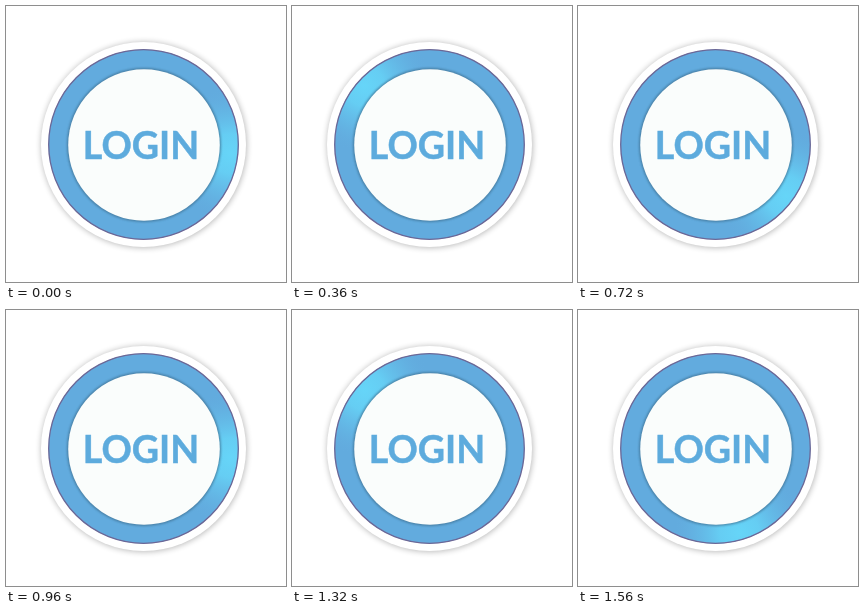
Recreate the animation shown at these times as an HTML page. Size 280 by 276 pixels, loop 1.6 s.

```html
<!DOCTYPE html>
<html lang="en">
<head>
<meta charset="utf-8">
<title>Login button</title>
<style>
html, body { margin: 0; width: 100%; height: 100%; overflow: hidden; background: #fff; }
svg { display: block; width: 280px; height: 276px; }
text { font: 700 37.6px Lato, Carlito, sans-serif; }
</style>
</head>
<body>
<svg viewBox="0 0 280 276">
  <defs>
    <radialGradient id="glow" gradientUnits="userSpaceOnUse" cx="225" cy="138.5" r="66">
      <stop offset="0" stop-color="#66d5f8"/>
      <stop offset=".3" stop-color="#66d2f6" stop-opacity=".88"/>
      <stop offset=".65" stop-color="#65c4ed" stop-opacity=".4"/>
      <stop offset="1" stop-color="#64addf" stop-opacity="0"/>
    </radialGradient>
    <filter id="soft" x="-20%" y="-20%" width="140%" height="140%">
      <feGaussianBlur stdDeviation="3.2"/>
    </filter>
    <filter id="rim" x="-10%" y="-10%" width="120%" height="120%">
      <feGaussianBlur stdDeviation="1.1"/>
    </filter>
  </defs>
  <circle cx="138" cy="139" r="102.5" fill="#000" opacity=".3" filter="url(#soft)"/>
  <circle cx="137.5" cy="138.5" r="102.5" fill="#fff"/>
  <circle cx="137.5" cy="138.5" r="95" fill="#62abde"/>
  <circle id="light" cx="137.5" cy="138.5" r="95" fill="url(#glow)"/>
  <circle cx="137.5" cy="138.5" r="94.8" fill="none" stroke="#6c6796" stroke-width="1.3"/>
  <circle cx="138" cy="139" r="77" fill="#3d6f91" opacity=".75" filter="url(#rim)"/>
  <circle cx="138" cy="139" r="75.8" fill="#fafdfc"/>
  <text x="135" y="152.6" text-anchor="middle" fill="#5dabdd" stroke="#5dabdd" stroke-width=".5">LOGIN</text>
</svg>
<script>
const LOOP = 1600, STEP = 40, TURN = 960;
// time in ms, counter-clockwise angle in degrees
const keys = [[0, -6], [160, 44], [360, 138], [560, 246], [600, 286], [920, 354], [960, 354]];
const slope = i => (keys[i + 1][1] - keys[i][1]) / (keys[i + 1][0] - keys[i][0]);

function tangent(i) {
  if (i === 0) return slope(0) * 0.8;
  if (i === keys.length - 1) return 0;
  const a = slope(i - 1), b = slope(i);
  return a * b > 0 ? 2 * a * b / (a + b) : 0;
}

function angleAt(t) {
  let i = 0;
  while (i < keys.length - 2 && t >= keys[i + 1][0]) i++;
  const [t0, a0] = keys[i], [t1, a1] = keys[i + 1];
  const h = t1 - t0, u = (t - t0) / h, v = 1 - u;
  return a0 * (1 + 2 * u) * v * v + a1 * u * u * (3 - 2 * u)
    + h * u * v * (tangent(i) * v - tangent(i + 1) * u);
}

const light = document.getElementById('light');

function draw(ms) {
  const t = Math.floor((ms % LOOP) / STEP) * STEP;
  light.setAttribute('transform', `rotate(${-angleAt(t % TURN)} 137.5 138.5)`);
}

let start;
function tick(now) {
  start ??= now;
  draw(now - start);
  requestAnimationFrame(tick);
}
draw(0);
requestAnimationFrame(tick);
</script>
</body>
</html>
```
